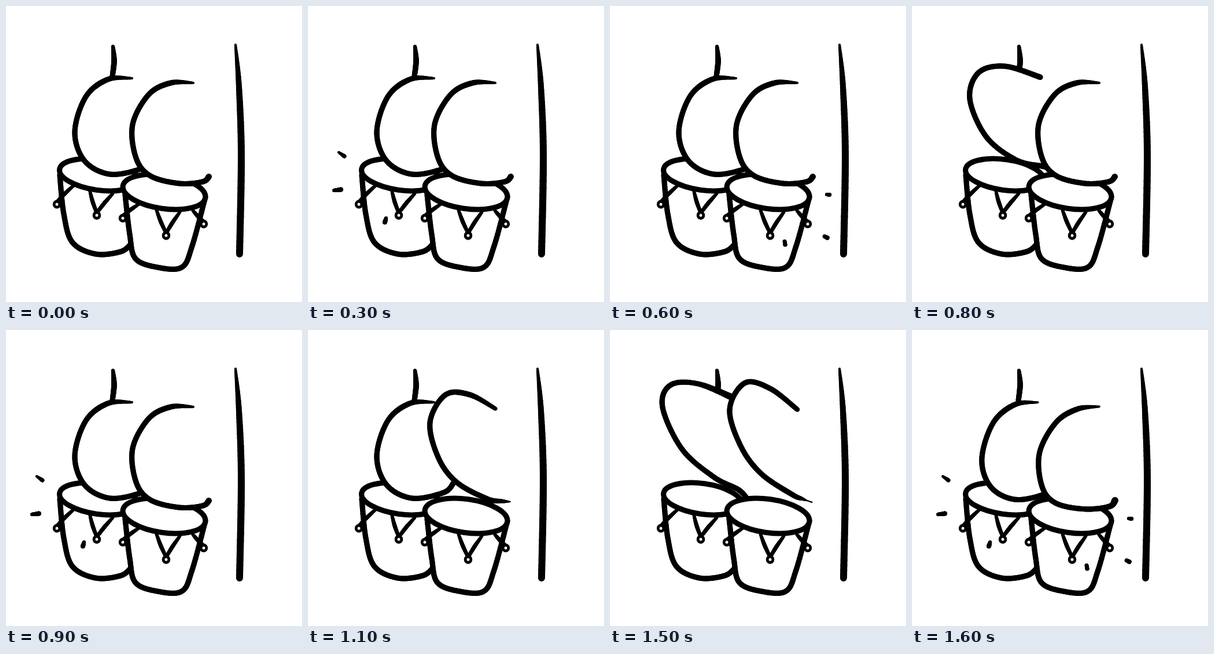
Animation of 512 by 512 pixels, one loop 1.7 s. Source, as an HTML page with a canvas:

```html
<!DOCTYPE html>
<html lang="en">
<head>
<meta charset="utf-8">
<title>Bongos</title>
<style>
html, body { margin: 0; height: 100%; overflow: hidden; background: #fff; }
canvas { display: block; width: 100vw; height: 100vh; }
</style>
</head>
<body>
<canvas id="stage" width="512" height="512"></canvas>
<script>
const ctx = document.getElementById('stage').getContext('2d');
const STEP = 100, STEPS = 17, PEN = 9.2, TILT = 0.14;

// "x,y,width x,y ..." -> [[x, y, width], ...]
const parse = text => text.split(' ').map(p => {
  const [x, y, w = PEN] = p.split(',').map(Number);
  return [x, y, w];
});
const mix = (a, b, k) => a.map((p, i) => p.map((v, j) => v + (b[i][j] - v) * k));

// Catmull-Rom curve through the key points, width included
function smooth(points) {
  const last = points.length - 1, out = [];
  const at = i => points[Math.max(0, Math.min(last, i))];
  for (let i = 0; i < last; i++) {
    const [a, b, c, d] = [at(i - 1), at(i), at(i + 1), at(i + 2)];
    for (let t = 0; t < 1; t += 1 / 16) {
      out.push(b.map((v, j) => v + t / 2 * (c[j] - a[j] +
        t * (2 * a[j] - 5 * v + 4 * c[j] - d[j] + t * (3 * (v - c[j]) + d[j] - a[j])))));
    }
  }
  return [...out, at(last)];
}

function brush(points, filled) {
  const curve = smooth(points);
  if (filled) {
    ctx.beginPath();
    curve.forEach(([x, y]) => ctx.lineTo(x, y));
    ctx.fill();
  }
  curve.slice(1).forEach(([x, y, w], i) => {
    ctx.lineWidth = Math.max(2, w);
    ctx.beginPath();
    ctx.moveTo(curve[i][0], curve[i][1]);
    ctx.lineTo(x, y);
    ctx.stroke();
  });
}

function oval(x, y, rx, ry, tilt, width) {
  ctx.lineWidth = width;
  ctx.beginPath();
  ctx.ellipse(x, y, rx, ry, tilt, 0, 7);
  ctx.fill();
  ctx.stroke();
}

// Each cord hangs from the front of the rim at x = top and ends in a ring
function drum({ x, y, rx, ry, body, cords }) {
  brush(body, true);
  oval(x, y, rx, ry, TILT, PEN);
  for (const [top, kx, ky] of cords) {
    const dx = top - x;
    const rimY = y + TILT * dx + ry * Math.sqrt(1 - (dx / rx) ** 2);
    brush([[top, rimY + 4, 5], [(top + kx) / 2 - 1, (rimY + ky) / 2, 7], [kx, ky - 4, 6]]);
  }
  for (const [, kx, ky] of cords) oval(kx, ky, 4.8, 5, 0, 4.8);
}

const lines = ['185,70,6 187,95,9.5 184,122,9', '397,67,4 403,140,10 407,260,12 404,429,12'].map(parse);

const drums = [
  {
    x: 160, y: 292, rx: 68, ry: 26.5,
    body: parse('93,292 100,360 115,409 155,429 198,425 216,412'),
    cords: [[117, 88, 343], [145, 157, 362], [185, 157, 362]]
  },
  {
    x: 273.5, y: 321.5, rx: 72, ry: 29,
    body: parse('206,326 214,395 224,437 262,452 304,452 322,415 345,330'),
    cords: [[230, 202, 367], [260, 277, 397], [301, 277, 397], [323, 342, 377]]
  }
];

// A cheek bends from "rest" towards "up"; lifts are the amounts on rising steps
const left = {
  rest: parse('218,125,4 176,127 138,157 119,218 136,268 180,291 235,281 252,264'),
  up: parse('220,124,7 168,115 126,135 109,188 132,246 180,278 230,279 246,273'),
  lifts: [1, 1.9, 2.8],
  marks: ['53,253,4 63,260,7', '45,319,6 57,317.5,8', '135,367,6 133,374,8'].map(parse)
};
const right = {
  rest: parse('324,133,4 285,133 247,153 219,205 225,263 250,294 300,307 340,304 351,295,10'),
  up: parse('324,136,7 280,112 238,112 211,160 226,222 258,264 310,292 335,296,7 350,297,2'),
  lifts: [0.7, 1, 1.5],
  marks: ['375,326,6 380,326.5,6.5', '371,398.5,6.5 376,401,7.5', '302,407,6.5 303,413,7'].map(parse)
};

// Phase 0-2 rises, 3 hits, anything else rests
function cheek({ rest, up, lifts }, phase, rebound) {
  const bend = phase === 3 ? rebound : lifts[phase] ?? 0;
  brush(mix(rest, up, bend), true);
}

function draw(step) {
  // Two left-right rounds of two-step rises, then one three-step rise together
  const finale = step > 12;
  const phase = offset => {
    if (finale) return step - 13;
    const k = (step + offset) % 6;
    return step === 0 ? -1 : [-1, 0, 1, 3][k] ?? -1;
  };
  const pairs = [[left, phase(0)], [right, phase(3)]];

  ctx.fillStyle = '#fff';
  ctx.strokeStyle = '#000';
  ctx.lineCap = 'round';
  ctx.fillRect(0, 0, 512, 512);
  lines.forEach(line => brush(line));
  drums.forEach(drum);
  for (const [side, p] of pairs) cheek(side, p, finale ? -0.18 : 0);
  for (const [side, p] of pairs) if (p === 3) side.marks.forEach(mark => brush(mark));
}

const start = performance.now();
function tick() {
  draw(Math.floor((performance.now() - start) / STEP) % STEPS);
  requestAnimationFrame(tick);
}
tick();
</script>
</body>
</html>
```
